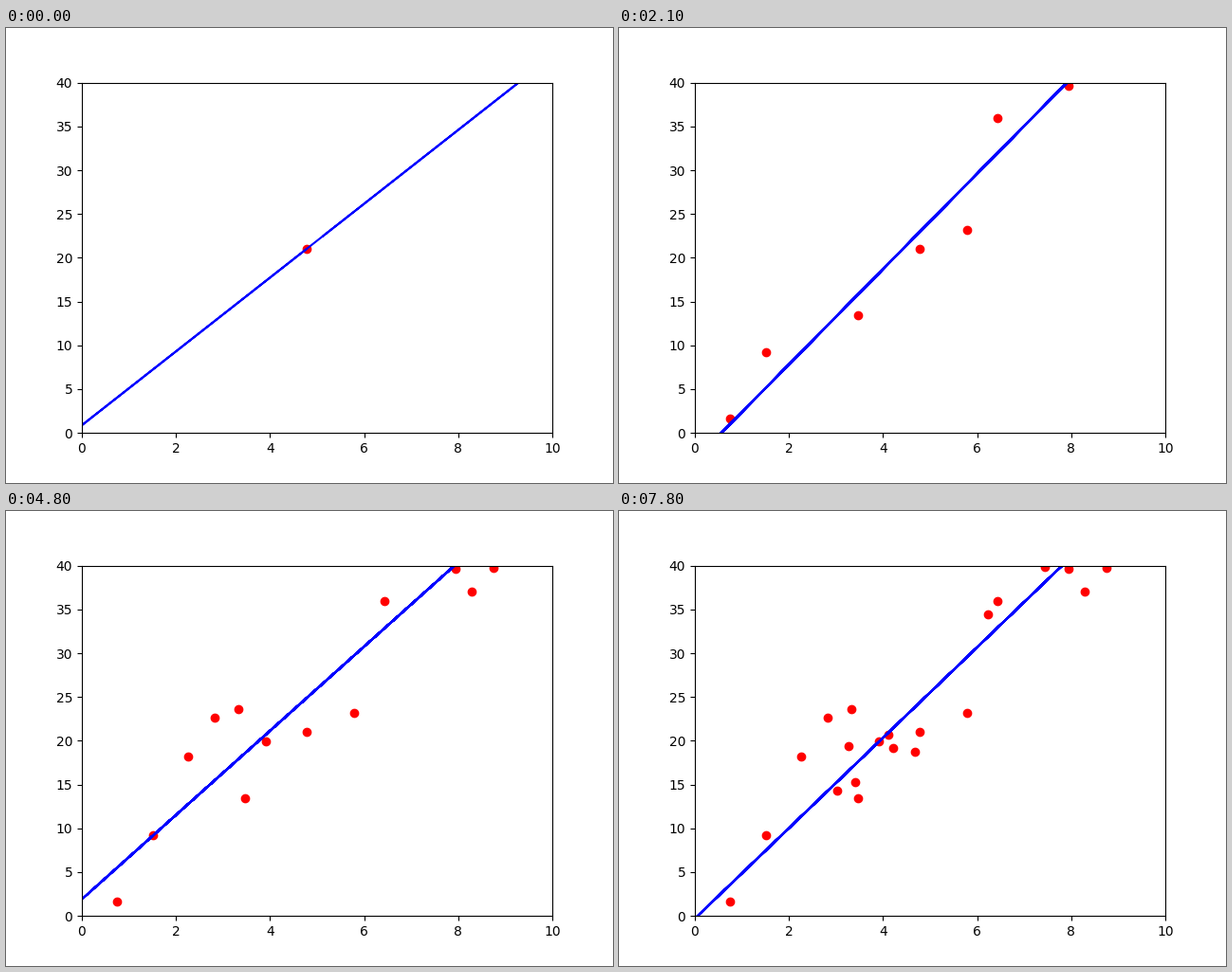
A matplotlib script for the animation above (8 s loop, 640x480 px).

```python
import numpy as np
import matplotlib.pyplot as plt
from matplotlib.animation import FuncAnimation

INTERVAL = 100       # ms per frame
FRAMES = 80
FRAMES_PER_POINT = 3

# An even grid on the x axis, visited in shuffled order.
order = np.random.RandomState(42).permutation(200)
x = np.linspace(0, 10, 200)[order]

# Noisy measurements in order of arrival; some lie outside the visible range.
y = np.array([21, 1.6, 9.2, 39.6, 36, 23.2, 13.4, 46.8, 39.7,
              18.2, 23.6, 52.8, 37, 19.9, 44, 49, 22.6, 44.2,
              20.7, 15.3, 34.4, -1.7, 39.8, 18.7, 19.4, 14.3, 19.2])


def fit_line(count):
    """Least squares over the first samples; the very first counts twice."""
    index = np.r_[0, :count]
    design = np.column_stack([x[index], np.ones(count + 1)])
    return np.linalg.lstsq(design, y[index], rcond=None)[0]


fig, ax = plt.subplots(figsize=(6.4, 4.8), dpi=100)
ax.set_xlim(0, 10)
ax.set_ylim(0, 40)

dots, = ax.plot([], [], "ro")
line, = ax.plot([], [], "b-")


def update(frame):
    count = frame // FRAMES_PER_POINT + 1
    slope, intercept = fit_line(count)
    dots.set_data(x[:count], y[:count])
    # The shuffled grid retraces the segment, which gives it crisp edges.
    line.set_data(x, slope * x + intercept)
    return dots, line


anim = FuncAnimation(fig, update, frames=FRAMES, interval=INTERVAL,
                     init_func=lambda: update(0), repeat=True, repeat_delay=0)
plt.show()
```
